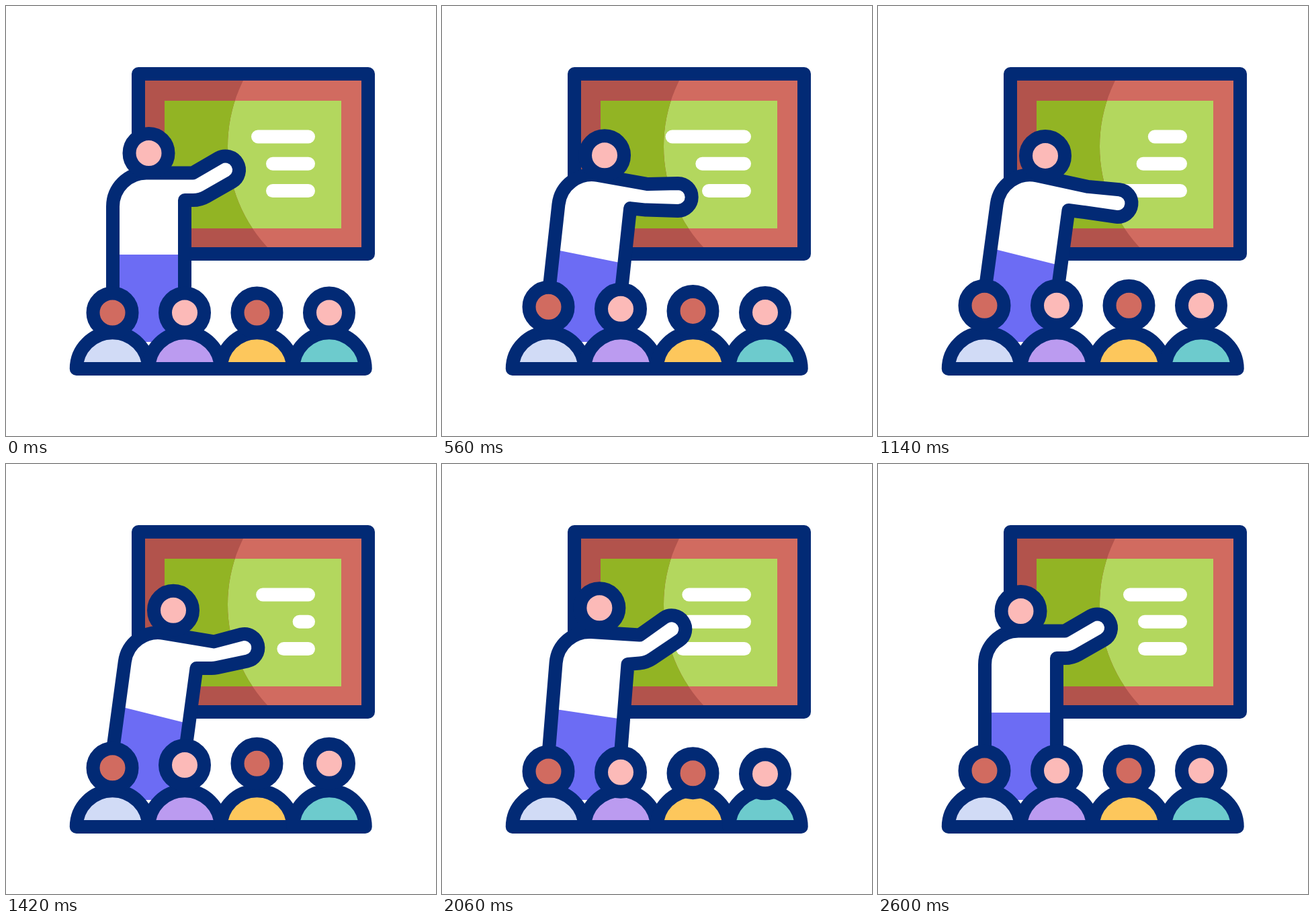
An HTML page with a canvas for the animation above (3000 ms loop, 640x640 px).

```html
<!DOCTYPE html>
<html lang="en">
<head>
<meta charset="utf-8">
<title>Presentation</title>
<style>
  html, body { margin: 0; width: 100%; height: 100%; overflow: hidden; background: #fff; }
  canvas { display: block; width: 640px; height: 640px; }
</style>
</head>
<body>
<canvas id="stage" width="640" height="640"></canvas>
<script>
const ctx = document.getElementById('stage').getContext('2d');
const LOOP = 3000, STEP = 20;
const NAVY = '#022a75', RED = '#d16b60', DARK_RED = '#b2534c', PINK = '#fcbab8';
const GREEN = '#b3d75e', DARK_GREEN = '#92b424', PURPLE = '#6c6cf4';
const SHIRTS = ['#d1dbf6', '#bb9bf0', '#fdc75c', '#6dcbcd'];
const TAU = Math.PI * 2;

// Points of the presenter; arm is the arm direction in degrees.
const REST = {
  head: [212.5, 219], footL: [159, 500], shoulder: [159, 248.5], elbow: [278, 248.5],
  hand: [326.5, 244], arm: [-30], under: [289, 289], armpit: [266, 289],
  footR: [266, 500], waistL: [159, 370], waistR: [266, 370]
};
const LEAN = {
  head: [249, 223], footL: [149, 500], shoulder: [184, 241], elbow: [313, 269],
  hand: [357, 294], arm: [7], under: [306, 307], armpit: [283.5, 304],
  footR: [257, 500], waistL: [168, 360.5], waistR: [272, 386.5]
};
const RAISE = {
  ...LEAN, head: [249, 211], shoulder: [183.3, 246], elbow: [305, 258.5],
  hand: [352, 247], arm: [-37], under: [315, 300]
};

const mix = (a, b, k) => a + (b - a) * k;

function ease(x) {
  x = Math.min(1, Math.max(0, x));
  return x * x * (3 - 2 * x);
}

// Eased values reached one after another, 500 ms apart.
function sequence(t, values) {
  const last = values.length - 1;
  const x = Math.min(last, Math.max(0, t / 500));
  const i = Math.min(last - 1, Math.floor(x));
  return mix(values[i], values[i + 1], ease(x - i));
}

function blend(a, b, k) {
  const pose = {};
  for (const key in a) pose[key] = a[key].map((v, i) => mix(v, b[key][i], k));
  return pose;
}

function poseAt(t) {
  if (t < 1100) return blend(REST, LEAN, ease((t - 200) / 500));
  if (t < 1800) return blend(LEAN, RAISE, ease((t - 1100) / 700));
  return blend(RAISE, REST, ease((t - 1800) / 600));
}

function rect(x, y, w, h, color) {
  ctx.fillStyle = color;
  ctx.fillRect(x, y, w, h);
}

function outline(path, color = NAVY) {
  ctx.strokeStyle = color;
  ctx.stroke(path);
}

function drawHead(x, y, color) {
  const path = new Path2D();
  path.arc(x, y, 29, 0, TAU);
  ctx.fillStyle = color;
  ctx.fill(path);
  outline(path);
}

function drawBoard(t) {
  rect(197, 101, 342, 268, RED);
  rect(236, 141, 263, 190, GREEN);

  // The shaded side is everything left of a large circle.
  ctx.save();
  const shade = new Path2D();
  shade.rect(197, 101, 342, 268);
  shade.arc(550, 209, 220, 0, TAU);
  ctx.beginPath();
  ctx.rect(197, 101, 250, 268);
  ctx.clip();
  ctx.clip(shade, 'evenodd');
  rect(197, 101, 250, 268, DARK_RED);
  rect(236, 141, 211, 190, DARK_GREEN);
  ctx.restore();

  const frame = new Path2D();
  frame.rect(197, 101, 342, 268);
  outline(frame);

  [375, 397, 397].forEach((left, i) => {
    const shift = sequence(t - 200 - 200 * i, [0, -40, 40, -40, 0]);
    const y = 194.5 + 40.3 * i;
    const line = new Path2D();
    line.moveTo(left + shift, y);
    line.lineTo(450, y);
    outline(line, '#fff');
  });
}

function drawPresenter(t) {
  const p = poseAt(t);
  const angle = p.arm[0] * Math.PI / 180;
  const body = new Path2D();
  body.moveTo(...p.footL);
  body.arcTo(...p.shoulder, ...p.elbow, 50);
  body.lineTo(...p.elbow);
  body.arc(...p.hand, 20.5, angle - Math.PI / 2, angle + Math.PI / 2);
  body.arcTo(...p.under, ...p.armpit, 40);
  body.lineTo(...p.armpit);
  body.lineTo(...p.footR);

  ctx.fillStyle = '#fff';
  ctx.fill(body);
  ctx.save();
  ctx.clip(body);
  ctx.fillStyle = PURPLE;
  ctx.beginPath();
  for (const point of [p.waistL, p.waistR, p.footR, p.footL]) ctx.lineTo(...point);
  ctx.fill();
  ctx.restore();
  outline(body);
  drawHead(...p.head, PINK);
}

function drawAudience(t) {
  const seat = i => 158.5 + 107.5 * i;
  SHIRTS.forEach((color, i) => {
    const body = new Path2D();
    body.arc(seat(i), 540, 53.75, Math.PI, TAU);
    body.closePath();
    ctx.fillStyle = color;
    ctx.fill(body);
    outline(body);
  });
  SHIRTS.forEach((_, i) => {
    const bob = sequence(t - 200 - 100 * i, [0, -10.7, -10.7, 5, 0]);
    drawHead(seat(i), 456.5 + bob, i % 2 ? PINK : RED);
  });
}

function draw(now) {
  const t = Math.floor(now % LOOP / STEP) * STEP;
  rect(0, 0, 640, 640, '#fff');
  ctx.lineWidth = 20;
  ctx.lineCap = ctx.lineJoin = 'round';
  drawBoard(t);
  drawPresenter(t);
  drawAudience(t);
}

let start;
function tick(now) {
  start ??= now;
  draw(Math.max(0, now - start));
  requestAnimationFrame(tick);
}
draw(0);
requestAnimationFrame(tick);
</script>
</body>
</html>
```
